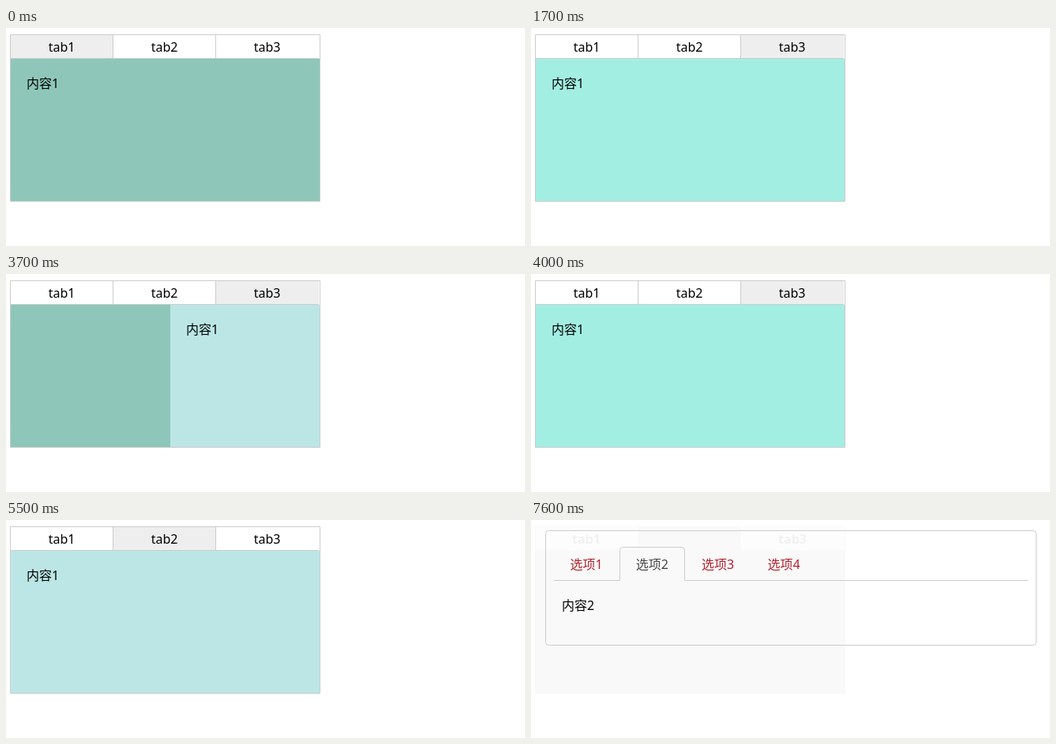
Write an HTML page that moves like this. It is 657 px wide and 276 px high and loops after 8000 ms.

```html
<!DOCTYPE html>
<html lang="zh">
<head>
<meta charset="utf-8">
<title>Tabs</title>
<style>
  html, body { margin: 0; width: 100%; height: 100%; overflow: hidden; background: #fff; }
  svg { display: block; width: 657px; height: 276px; }
  text { font: 16px "Noto Sans", "Noto Sans CJK SC", "Noto Sans CJK", sans-serif; fill: #000; }
  .mid { text-anchor: middle; }
  .line { fill: none; stroke: #ccc; }
  .ghost text { font-weight: 700; fill: #f1f1f1; }
  #links text { fill: #b0202c; }
  #links text.on { fill: #444; }
</style>
</head>
<body>
<svg viewBox="0 0 657 276">
  <defs>
    <clipPath id="view"><rect x="6" y="39" width="391" height="180"/></clipPath>
  </defs>

  <g id="slider">
    <rect id="active" y="9" width="129" height="29" fill="#eee"/>
    <g clip-path="url(#view)"><g id="strip"></g></g>
    <path class="line" d="M5.5 8.5H397.5V219.5H5.5ZM6 38.5H396M135.5 9V38M265.5 9V38"/>
    <g id="heads"></g>
  </g>

  <g id="options">
    <g class="ghost">
      <rect x="5" y="8" width="393" height="212" fill="#f9f9f9"/>
      <rect x="6" y="9" width="129" height="29" fill="#fdfdfd"/>
      <rect x="266" y="9" width="131" height="29" fill="#fdfdfd"/>
      <text class="mid" x="70" y="30">tab1</text>
      <text class="mid" x="331" y="30">tab3</text>
    </g>
    <rect class="line" x="18.5" y="13.5" width="621" height="145" rx="4"/>
    <path id="outline" class="line"/>
    <g id="links"></g>
    <text id="body" x="39" y="114"></text>
  </g>
</svg>

<script>
const LOOP = 8000, STEP = 100, SLIDE = 400, WIDTH = 391;
const COLORS = ["#8ec7b9", "#bce6e6", "#a3eee2"];

// click time, lead into the slide, from tab, to tab
const SLIDES = [
  [500, 45, 0, 1],
  [1400, 86, 1, 2],
  [2100, 45, 2, 1],
  [2900, 65, 1, 0],
  [3600, 31, 0, 2],
  [4600, 86, 2, 0],
  [5200, 86, 0, 1]
];
const OPTIONS_AT = 6700, SECOND_AT = 7600;

const $ = id => document.getElementById(id);

function add(parent, tag, attrs, label = "") {
  const el = document.createElementNS("http://www.w3.org/2000/svg", tag);
  for (const key in attrs) el.setAttribute(key, attrs[key]);
  el.textContent = label;
  parent.append(el);
  return el;
}

COLORS.forEach((fill, i) => {
  const x = 6 + i * WIDTH;
  add($("strip"), "rect", { x, y: 39, width: WIDTH, height: 180, fill });
  add($("strip"), "text", { x: x + 20, y: 76 }, "内容1");
  add($("heads"), "text", { x: 70.5 + i * 130, y: 30, class: "mid" }, "tab" + (i + 1));
});

const links = [0, 1, 2, 3].map(i =>
  add($("links"), "text", { x: 49.5 + i * 83.3, y: 62 }, "选项" + (i + 1)));

const swing = p => 0.5 - Math.cos(Math.PI * p) / 2;

function drawSlider(t) {
  let tab = 0, pos = 0;
  for (const [at, lead, from, to] of SLIDES) {
    if (t < at) break;
    const run = t - at + lead;
    const p = run > SLIDE - 20 ? 1 : swing(run / SLIDE);
    tab = to;
    pos = from + (to - from) * p;
  }
  $("active").setAttribute("x", 6 + tab * 130);
  $("active").setAttribute("width", tab ? 129 + (tab === 2) : 129);
  $("strip").setAttribute("transform", `translate(${-Math.round(pos * WIDTH)} 0)`);
}

function drawOptions(t) {
  const on = t >= SECOND_AT ? 1 : 0;
  const x = 29.5 + on * 83;
  $("outline").setAttribute("d",
    `M29 76.5H${x}V38.5q0 -4 4 -4h74q4 0 4 4V76.5H629`);
  links.forEach((el, i) => el.classList.toggle("on", i === on));
  $("body").textContent = "内容" + (on + 1);
}

function draw(time) {
  const t = Math.floor(time % LOOP / STEP) * STEP;
  const late = t >= OPTIONS_AT;
  $("slider").style.display = late ? "none" : "";
  $("options").style.display = late ? "" : "none";
  late ? drawOptions(t) : drawSlider(t);
}

const start = performance.now();
function tick() {
  draw(performance.now() - start);
  requestAnimationFrame(tick);
}
tick();
</script>
</body>
</html>
```
